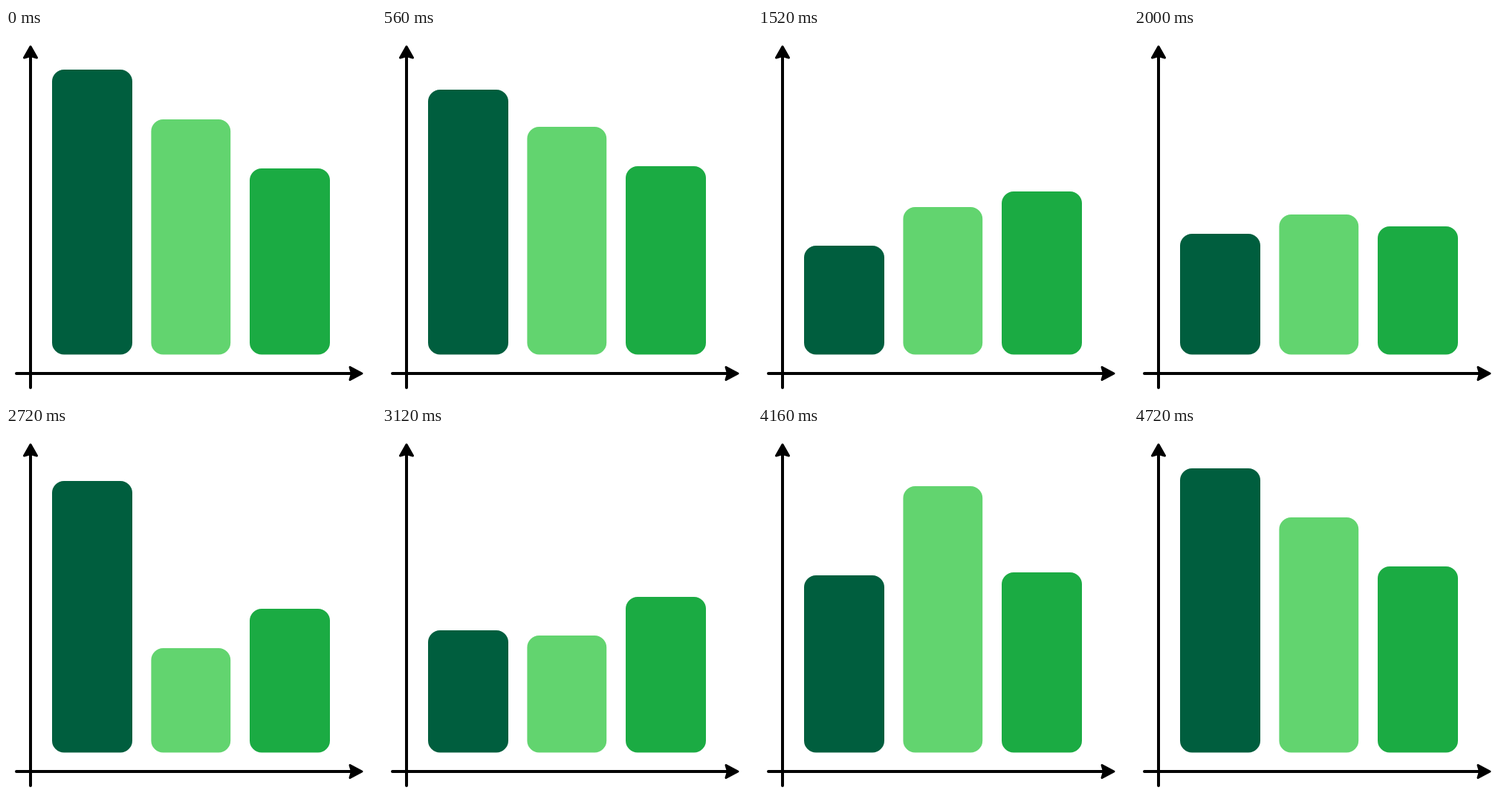
Animation of 498 by 498 pixels, one loop 4.8 s. Source, as an HTML page:

```html
<!DOCTYPE html>
<html lang="en">
<head>
<meta charset="utf-8">
<title>Bar chart</title>
<style>
  html, body { margin: 0; width: 100%; height: 100%; overflow: hidden; background: #fff; }
  svg { display: block; width: 498px; height: 498px; }
  .axis { stroke: #000; stroke-width: 4; stroke-linecap: round; }
  .head { stroke: #000; stroke-width: 3; stroke-linejoin: round; }
</style>
</head>
<body>
<svg viewBox="0 0 498 498">
  <g id="bars"></g>
  <path class="axis" d="M33 30V484M14 465H474"/>
  <path class="head" d="M33 25L41.5 40L33 37.5L24.5 40Z"/>
  <path class="head" d="M479 465L463 473.5L465.5 465L463 456.5Z"/>
</svg>
<script>
const LOOP = 4800, STEP = 80, BASE = 439.5;

// keys: [time in ms, top edge in px]
const bars = [
  { x: 62, w: 108, fill: '#005e3e',
    keys: [[0, 56], [1780, 297], [2550, 67], [3520, 346], [LOOP, 56]] },
  { x: 195.4, w: 106.8, fill: '#62d46f',
    keys: [[0, 123], [2080, 251], [2880, 301], [3740, 69], [LOOP, 123]] },
  { x: 328, w: 108, fill: '#1bab43',
    keys: [[0, 189], [1080, 184], [2000, 267], [3400, 229], [4640, 189], [LOOP, 189]] }
];

// cubic-bezier(.7, 0, .3, 1)
function ease(x) {
  let lo = 0, hi = 1, u = 0.5;
  for (let i = 0; i < 20; i++) {
    u = (lo + hi) / 2;
    const v = 1 - u;
    if (2.1 * u * v * v + 0.9 * u * u * v + u * u * u < x) lo = u;
    else hi = u;
  }
  return u * u * (3 - 2 * u);
}

function topAt(keys, t) {
  const i = keys.findIndex(key => t < key[0]);
  const [t0, y0] = keys[i - 1], [t1, y1] = keys[i];
  return y0 + (y1 - y0) * ease((t - t0) / (t1 - t0));
}

const group = document.getElementById('bars');
for (const bar of bars) {
  bar.el = document.createElementNS(group.namespaceURI, 'rect');
  const attrs = { x: bar.x, width: bar.w, rx: 16, ry: 16, fill: bar.fill };
  for (const name in attrs) bar.el.setAttribute(name, attrs[name]);
  group.append(bar.el);
}

function draw(t) {
  for (const bar of bars) {
    const y = Math.round(topAt(bar.keys, t));
    bar.el.setAttribute('y', y);
    bar.el.setAttribute('height', BASE - y);
  }
}

const start = performance.now();
function tick() {
  const t = (performance.now() - start) % LOOP;
  draw(Math.floor(t / STEP) * STEP);
  requestAnimationFrame(tick);
}
tick();
</script>
</body>
</html>
```
